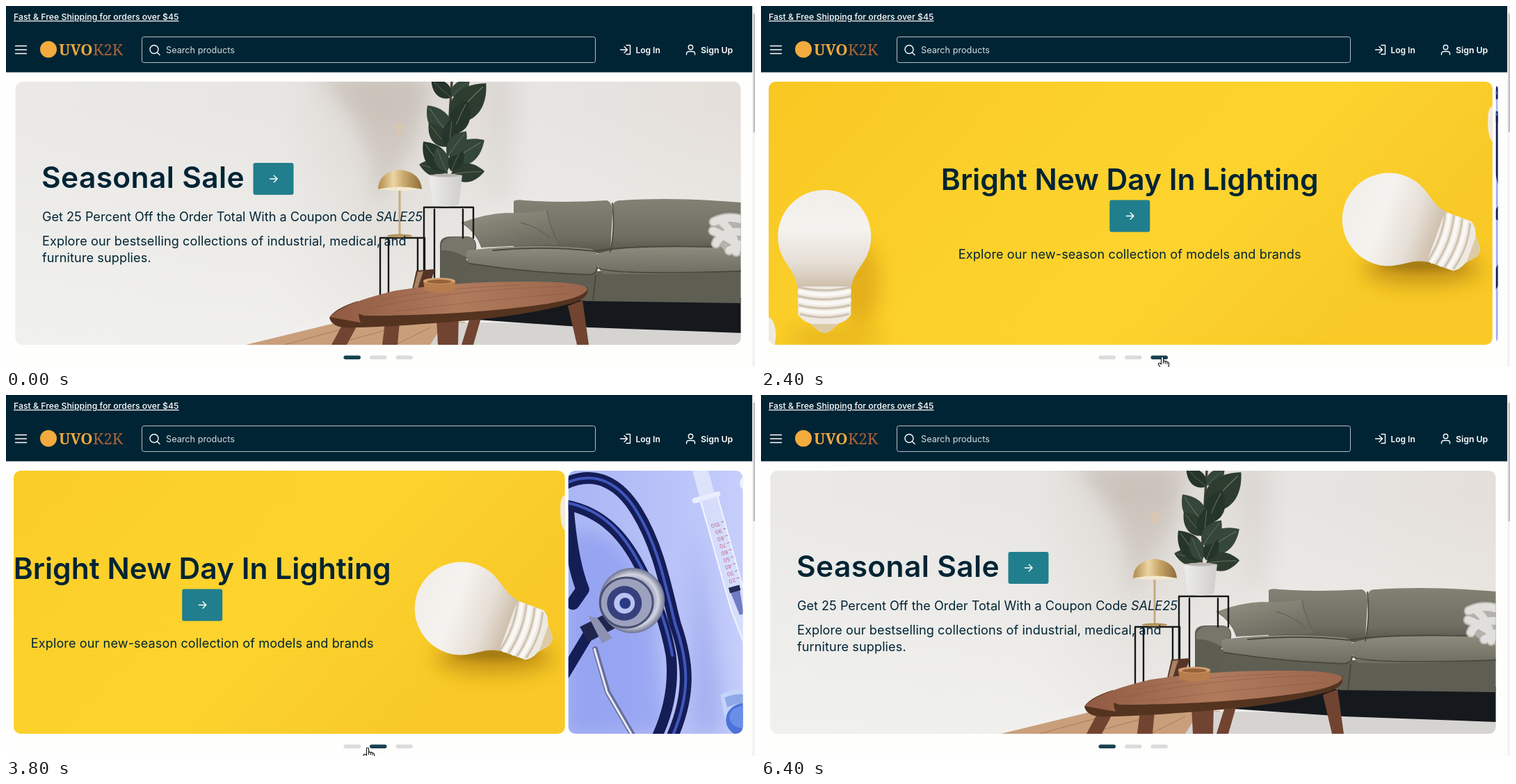
Animation of 1077x520 px, one loop 6.6 s. Source, as an HTML page:

```html
<!DOCTYPE html>
<html lang="en">
<head>
<meta charset="utf-8">
<title>Store carousel</title>
<style>
html, body { margin: 0; width: 100%; height: 100%; overflow: hidden; background: #fefefd; }
svg { display: block; width: 1077px; height: 520px; }
text { font-family: Inter, "Open Sans", sans-serif; font-optical-sizing: none; fill: #002434; white-space: pre; }
.h { font-size: 42.5px; font-weight: 600; }
.p { font-size: 18.1px; font-weight: 400; letter-spacing: .1px; }
.bar text { fill: #fff; font-size: 12.3px; font-weight: 600; }
.bar .logo { font-family: "Noto Serif", "Liberation Serif", serif; font-size: 22px; }
.line { fill: none; stroke: #fff; stroke-width: 1.4; stroke-linecap: round; stroke-linejoin: round; }
.num { font-size: 8px; fill: #c4668f; }
.n { fill: none; stroke-linecap: round; stroke-linejoin: round; }
</style>
</head>
<body>
<svg viewBox="0 0 1077 520" xmlns="http://www.w3.org/2000/svg">
<defs>
  <clipPath id="view"><rect x="11" y="109" width="1048.5" height="379" rx="10"/></clipPath>
  <clipPath id="card"><rect x="13.5" y="109" width="1043" height="379" rx="10"/></clipPath>
  <filter id="b6" x="-50%" y="-50%" width="200%" height="200%"><feGaussianBlur stdDeviation="6"/></filter>
  <filter id="b14" x="-60%" y="-60%" width="220%" height="220%"><feGaussianBlur stdDeviation="14"/></filter>
  <linearGradient id="wall">
    <stop offset="0" stop-color="#eae9e7"/><stop offset=".36" stop-color="#e8e6e3"/>
    <stop offset=".5" stop-color="#dcd7d2"/><stop offset=".6" stop-color="#e0dcd8"/>
    <stop offset=".72" stop-color="#e7e4e2"/><stop offset="1" stop-color="#e4dfda"/>
  </linearGradient>
  <linearGradient id="lift" x2="0" y2="1">
    <stop offset=".1" stop-color="#f3f3f0" stop-opacity="0"/><stop offset="1" stop-color="#f3f3f0" stop-opacity=".75"/>
  </linearGradient>
  <linearGradient id="brass">
    <stop offset="0" stop-color="#b08a4b"/><stop offset=".35" stop-color="#ecd5a4"/>
    <stop offset=".6" stop-color="#c9a668"/><stop offset="1" stop-color="#8f6c3b"/>
  </linearGradient>
  <linearGradient id="wood">
    <stop offset="0" stop-color="#8f5a42"/><stop offset=".5" stop-color="#b07a5d"/><stop offset="1" stop-color="#9a654b"/>
  </linearGradient>
  <linearGradient id="pot"><stop offset="0" stop-color="#ededec"/><stop offset="1" stop-color="#cfcdca"/></linearGradient>
  <linearGradient id="fabric" x2="0" y2="1"><stop offset="0" stop-color="#828174"/><stop offset=".7" stop-color="#6f6e62"/><stop offset="1" stop-color="#55554a"/></linearGradient>
  <linearGradient id="seat" x2="0" y2="1"><stop offset="0" stop-color="#8e8c7f"/><stop offset="1" stop-color="#6e6d61"/></linearGradient>
  <linearGradient id="pillow" x2=".6" y2="1"><stop offset="0" stop-color="#949284"/><stop offset="1" stop-color="#6d6c60"/></linearGradient>
  <linearGradient id="sun" x2="1" y2=".35">
    <stop offset="0" stop-color="#f8c722"/><stop offset=".4" stop-color="#fcd02b"/>
    <stop offset=".7" stop-color="#fdd32e"/><stop offset="1" stop-color="#f8c927"/>
  </linearGradient>
  <linearGradient id="glass" x2="0" y2="1">
    <stop offset="0" stop-color="#f1eeea"/><stop offset=".4" stop-color="#f5f3ef"/>
    <stop offset=".75" stop-color="#e6dfd6"/><stop offset="1" stop-color="#cfc0ad"/>
  </linearGradient>
  <linearGradient id="cool">
    <stop offset="0" stop-color="#a9b5f4"/><stop offset=".2" stop-color="#c0c9fa"/>
    <stop offset=".38" stop-color="#d9dffc"/><stop offset=".65" stop-color="#e6ecfc"/><stop offset="1" stop-color="#edf2fd"/>
  </linearGradient>
  <radialGradient id="chest">
    <stop offset="0" stop-color="#c5cbe6"/><stop offset=".4" stop-color="#4d5694"/>
    <stop offset=".8" stop-color="#d3d5e0"/><stop offset="1" stop-color="#6d7290"/>
  </radialGradient>
  <path id="leaf" d="M0 0C-14-7-17-26 1-42C17-26 15-8 0 0Z"/>
  <g id="btn">
    <rect width="58" height="46" rx="3" fill="#217e8c"/>
    <path class="line" d="M24 23H34.5M29.8 18.2L34.6 23L29.8 27.8"/>
  </g>
  <g id="bulb">
    <path d="M-38 60L-38 112Q-33 121 -21 125L-7 137Q0 140 7 137L21 125Q34 121 38 112V60Z" fill="#eee9e2"/>
    <path d="M-67 0A67 67 0 0 1 67 0C67 36 42 46 39 72H-39C-42 46-67 36-67 0Z" fill="url(#glass)"/>
    <path class="n" d="M-37 73Q0 82 37 73M-37 86Q0 95 37 86M-36 99Q0 108 36 99M-34 112Q0 121 34 112" stroke="#cfc2b0" stroke-width="3"/>
    <path class="n" d="M-36 79Q0 88 36 79M-36 92Q0 101 36 92M-35 105Q0 114 35 105" stroke="#faf8f5" stroke-width="5"/>
    <path d="M-20 126H20L7 137Q0 140-7 137Z" fill="#dccba6"/>
  </g>
  <path id="clamp" d="M326 214L305 186Q302 172 317 173Q331 174 328 188L326 218L341 270L351 335L354 390M324 214L330 250L345 312L366 372L388 359"/>
  <g id="rings"><ellipse cx="330" cy="405" rx="22" ry="26"/><ellipse cx="409" cy="377" rx="24" ry="27" transform="rotate(-20 409 377)"/></g>
  <path id="knot" d="M1018 311Q1040 300 1064 310M1017 324Q1034 330 1064 352M1021 342Q1030 322 1064 326M1030 312Q1048 326 1050 354M1040 352L1064 340"/>
</defs>

<rect width="1077" height="520" fill="#fefefd"/>

<g clip-path="url(#view)">
  <g id="s0"><g clip-path="url(#card)">
    <rect x="13" y="109" width="1044" height="379" fill="url(#wall)"/>
    <path d="M445 100H610L590 190Q560 250 525 300Q545 180 445 100Z" fill="#b9aea3" opacity=".5" filter="url(#b14)"/>
    <path d="M690 100H728V280H690Z" fill="#d0cac4" opacity=".45" filter="url(#b14)"/>
    <rect x="13" y="109" width="1044" height="379" fill="url(#lift)"/>
    <ellipse cx="566" cy="177" rx="6" ry="9" fill="#dfc6a8" opacity=".6"/>
    <path d="M330 488L480 441H640V488Z" fill="#f0efed"/>
    <path d="M345 488L480 455H660V488Z" fill="#c99f7b"/>
    <path d="M400 488L500 461M470 488L560 463M560 488L610 463" stroke="#a97c58" fill="none"/>
    <path d="M630 456Q800 455 1057 468V488H610Z" fill="#d6d4d1"/>
    <path d="M650 395L1057 420V471L838 463L650 450Z" fill="#15191d"/>

    <!-- sofa -->
    <path d="M730 281Q735 278 745 280Q800 284 864 280Q873 283 872 300L869 356H730Z" fill="url(#fabric)"/>
    <path d="M873 286Q875 279 886 280Q960 275 1057 283V356H869Q876 320 873 286Z" fill="url(#fabric)"/>
    <path d="M624 344Q624 332 640 332H664Q678 334 676 350L662 365V413L624 404Z" fill="#5d5d52"/>
    <path d="M626 344Q630 333 644 333H664Q676 335 675 348L662 362Q640 350 626 352Z" fill="#77766a"/>
    <path d="M660 366L848 382L1057 379V428L834 425L661 402Z" fill="#5f5e53"/>
    <path d="M664 352Q750 341 842 350Q856 355 850 382Q846 387 836 386Q740 382 666 370Q659 360 664 352Z" fill="url(#seat)"/>
    <path d="M850 357Q880 346 960 346Q1020 344 1057 350V381Q960 388 858 386Q846 370 850 357Z" fill="url(#seat)"/>
    <path class="n" d="M666 371Q750 384 836 387Q850 387 850 376Q860 388 1057 382M848 388L844 424" stroke="#45453c" stroke-width="1.6"/>
    <path class="n" d="M872 284Q876 320 869 354M700 352Q770 345 846 353Q900 344 1020 347" stroke="#484840" stroke-width="1.8"/>
    <path d="M655 312Q690 299 720 298Q750 299 778 295Q784 320 796 343Q740 345 684 348Q677 326 655 312Z" fill="url(#pillow)"/>
    <path class="n" d="M655 312Q677 326 684 348M778 295Q782 322 796 343M740 312Q765 318 782 334" stroke="#5a594e"/>
    <path d="M1012 314Q1016 302 1040 303L1057 306V360Q1020 356 1012 314Z" fill="#b5b1ac"/>
    <g class="n">
      <use href="#knot" stroke="#b5b1ac" stroke-width="15"/>
      <use href="#knot" stroke="#e1dfdb" stroke-width="11"/>
    </g>

    <!-- side tables, lamp and plant -->
    <path class="n" d="M601 400V290H672V334M616 395V293M657 334V293" stroke="#16181a" stroke-width="2.4"/>
    <path class="n" d="M538 420V334H602V390M550 418V336M592 386V336" stroke="#16181a" stroke-width="2.4"/>
    <path d="M566 262V331" stroke="#c5ab7e" stroke-width="3"/>
    <ellipse cx="566" cy="331" rx="18" ry="2.5" fill="#b4945f"/>
    <path d="M535 264Q536 239 566 236Q596 239 598 264Q566 258 535 264Z" fill="url(#brass)"/>
    <path d="M535 264Q566 257 598 264Q566 268 535 264Z" fill="#f4e9d1"/>
    <path class="n" d="M633 246Q637 180 641 108" stroke="#4b4233" stroke-width="3.5"/>
    <g id="plant"></g>
    <path d="M608 244Q632 239 656 244L651 286Q632 292 614 286Z" fill="url(#pot)"/>
    <path d="M608 244Q632 239 656 244Q632 249 608 244Z" fill="#b9b4ad"/>

    <!-- coffee table -->
    <path d="M590 381L617 379L606 410L584 408Z" fill="#553526"/>
    <path d="M592 383L600 382L592 407L586 406Z" fill="#a98264"/>
    <path d="M482 462L504 462L490 488H468ZM545 455H566L563 488H541ZM619 448L651 446L650 488H621ZM668 446H684L672 488H655ZM808 432L829 424L838 488H821Z" fill="#714431"/>
    <path d="M465 449Q472 436 506 425L520 446Q700 444 836 405Q840 420 815 428Q740 448 640 455Q540 463 503 463Q469 466 465 449Z" fill="#54331f"/>
    <path d="M465 448Q484 428 560 410Q650 396 760 397Q835 398 836 408Q830 424 740 434Q640 446 515 446L507 443Q507 450 510 456Z" fill="url(#wood)"/>
    <path class="n" d="M520 436Q640 408 800 404M560 440Q680 424 810 414M540 424Q620 406 740 402" stroke="#7f5039" opacity=".4"/>
    <path d="M600 396L602 409Q623 417 645 409L646 396Z" fill="#b87d4d"/>
    <ellipse cx="623" cy="396" rx="23" ry="4.5" fill="#d5a173"/><ellipse cx="623" cy="397" rx="18" ry="3" fill="#986239"/>
    </g>
    <g>
      <text class="h" x="51" y="262" letter-spacing=".35">Seasonal Sale</text>
      <use href="#btn" x="355.500" y="226"/>
      <text class="p" x="52" y="310" style="letter-spacing:0">Get 25 Percent Off the Order Total With a Coupon Code <tspan font-style="italic">SALE25</tspan></text>
      <text class="p" x="52" y="344.500">Explore our bestselling collections of industrial, medical, and</text>
      <text class="p" x="52" y="368.500">furniture supplies.</text>
    </g>
  </g>

  <g id="s1"><g clip-path="url(#card)">
    <rect x="13" y="109" width="1044" height="379" fill="url(#sun)"/>
    <ellipse cx="145" cy="400" rx="30" ry="62" fill="#dba317" opacity=".75" filter="url(#b14)"/>
    <ellipse cx="110" cy="478" rx="70" ry="16" fill="#d9a418" opacity=".6" filter="url(#b14)"/>
    <ellipse cx="955" cy="378" rx="85" ry="24" fill="#c18f12" opacity=".85" filter="url(#b14)"/>
    <ellipse cx="955" cy="372" rx="60" ry="9" fill="#8f6a10" opacity=".7" filter="url(#b6)"/>
    <ellipse cx="14" cy="474" rx="12" ry="26" fill="#efeae0"/>
    <path d="M1057 144Q1049 146 1050 168Q1050 190 1057 196Z" fill="#f0ece4"/>
    <use href="#bulb" x="96" y="332"/>
    <use href="#bulb" transform="translate(907.500 307.500) rotate(-70)"/>
    </g>
    <g text-anchor="middle">
      <text class="h" x="535" y="265">Bright New Day In Lighting</text>
      <use href="#btn" x="506" y="279.500"/>
      <text class="p" x="535" y="364">Explore our new-season collection of models and brands</text>
    </g>
  </g>

  <g id="s2"><g clip-path="url(#card)">
    <rect x="13" y="109" width="1044" height="379" fill="url(#cool)"/>
    <g transform="translate(-6 0)">
      <path d="M20 205Q100 180 140 290L160 488H20Z" fill="#7f90ee" opacity=".5" filter="url(#b14)"/>
      <path d="M200 190Q200 340 195 488H240V430Z" fill="#8c9ae6" opacity=".5" filter="url(#b14)"/>
      <g class="n" stroke="#151d57">
        <path d="M14 128C60 106 95 130 118 168C150 220 160 280 173 330C192 385 196 430 168 494" stroke-width="17"/>
        <path d="M14 158C70 168 100 205 121 245C145 290 160 335 167 375C172 420 162 460 146 494" stroke-width="15"/>
        <path d="M18 165Q24 240 40 280L26 300" stroke-width="19"/>
        <path d="M14 402L50 342" stroke-width="16"/>
        <path d="M14 128C60 106 95 130 118 168C150 220 160 280 173 330C192 385 196 430 168 494M16 155C70 165 100 202 121 242C145 287 162 335 169 375" stroke="#3f57bd" stroke-width="4"/>
      </g>
      <path class="n" d="M58 366L76 428L112 490" stroke="#686e98" stroke-width="8"/>
      <path class="n" d="M57 366L75 428L111 490" stroke="#e6e9f8" stroke-width="3"/>
      <path d="M85 309L96 331L48 356L36 334Z" fill="#1f254c"/>
      <path d="M48 318L62 322L82 350L68 358Z" fill="#8c91b2"/>
      <circle cx="111" cy="296" r="47" fill="url(#chest)"/>
      <ellipse cx="103" cy="299" rx="38" ry="36" fill="#9ca1be" stroke="#4a5072" stroke-width="3"/>
      <circle cx="100" cy="300" r="25" fill="#37407c"/><circle cx="100" cy="300" r="15" fill="#b9c4f2"/>
      <circle cx="101" cy="300" r="8" fill="#2b3a84"/>

      <g transform="translate(211 112) rotate(-15.500)">
        <rect x="-12" y="-12" width="22" height="45" fill="#dde3fb"/>
        <rect x="-24" y="32" width="42" height="8" rx="4" fill="#e9edfd"/>
        <path d="M-14 38H14V200L10 286H-4L-12 200Z" fill="#dfe5fd" opacity=".7"/>
        <path d="M-12 40V200L-4 286M13 40V200L10 286" fill="none" stroke="#f1f4ff" stroke-width="2"/>
        <path d="M-6 176H8L4 212H-2Z" fill="#6f7cc4"/><path d="M-7 170H9V178H-7Z" fill="#222b58"/>
        <g id="scale"></g>
      </g>
      <ellipse cx="274" cy="127" rx="8" ry="10" fill="#eff4ff"/><ellipse cx="300" cy="121" rx="9" ry="7" fill="#bfe0ee"/>

      <path d="M343 109H360L389 212L374 217Z" fill="#595f83"/>
      <path class="n" d="M352 112L381 212" stroke="#b4b8d4" stroke-width="4" stroke-dasharray="2 2"/>
      <path d="M374 216L388 211L401 258L415 318Q412 328 404 326L389 262Z" fill="#eef0fb"/>
      <path class="n" d="M388 212L401 258L415 318M390 262L402 258" stroke="#6d7295" stroke-width="2"/>

      <g class="n" stroke="#7d83ab" stroke-width="8"><use href="#clamp"/><use href="#rings"/></g>
      <g class="n" stroke="#dcdff2" stroke-width="4.5"><use href="#clamp"/><use href="#rings"/></g>
      <path d="M290 488L330 474L476 426L477 430L372 470L322 488ZM355 488L420 466L483 452L483 455L400 488Z" fill="#7b809f"/>
      <path class="n" d="M312 484L474 429M376 486L480 454" stroke="#c9cde0" stroke-width="2"/>
      <path d="M238 432Q266 416 292 432L299 470L246 474Z" fill="#c4d3fa"/>
      <path d="M244 436Q266 426 288 436L286 448Q266 440 248 450Z" fill="#8fa9e6"/>
      <ellipse cx="272" cy="468" rx="26" ry="24" fill="#4d72d8"/><ellipse cx="271" cy="464" rx="20" ry="16" fill="#6a8fe8"/>
    </g></g>
    <g>
      <text class="h" x="442" y="254" letter-spacing=".1">Best-Priced Medical</text>
      <text class="h" x="442" y="302.500" letter-spacing=".1">Supplies</text>
      <use href="#btn" x="630.500" y="267.500"/>
      <text class="p" x="442" y="352">Find and buy quality medical equipment and home healthcare</text>
      <text class="p" x="442" y="376">supplies</text>
    </g>
  </g>
</g>

<g class="bar">
  <rect width="1073" height="95.500" fill="#002434"/>
  <text x="11" y="20" style="font-weight:500;text-decoration:underline">Fast &amp; Free Shipping for orders over $45</text>
  <path class="line" d="M13.500 57.500H29.500M13.500 63H29.500M13.500 68.500H29.500" stroke-width="2"/>
  <circle cx="61" cy="62.500" r="12" fill="#f2ab3c"/>
  <text class="logo" x="76" y="71" style="fill:#f2ab3c;font-weight:700">UVO</text>
  <text class="logo" x="125" y="71" style="fill:#a9623a;font-weight:400">K2K</text>
  <rect x="195.500" y="44.500" width="652" height="37" rx="3" fill="none" stroke="#b5c1c6"/>
  <circle class="line" cx="213" cy="62.500" r="6"/><path class="line" d="M217.500 67L221 70.500"/>
  <text x="230" y="67.500" style="font-size:12.700px;font-weight:400;fill:#d5dde0">Search products</text>
  <path class="line" d="M883.500 63H893M889 58.500L893.500 63L889 67.500M892 56.500H897.500V69.500H892"/>
  <text x="905.500" y="67.500" style="font-size:12px">Log In</text>
  <circle class="line" cx="984.500" cy="59.500" r="3.200"/>
  <path class="line" d="M978.500 70V68.500Q979 65.500 982 65.500H987Q990.500 65.500 990.500 68.500V70"/>
  <text x="999" y="67.500">Sign Up</text>
</g>
<rect x="1073" width="4" height="520" fill="#f4f4f3"/>
<rect x="1074.500" y="11" width="3" height="171" fill="#bfbfbf"/>

<g id="dots">
  <rect x="485.500" y="503.500" width="24.500" height="5.500" rx="2.700"/>
  <rect x="523" y="503.500" width="24.500" height="5.500" rx="2.700"/>
  <rect x="560.500" y="503.500" width="24.500" height="5.500" rx="2.700"/>
</g>
<path id="hand" d="M-1.500 1Q0-1 1.500 1V6.500Q3 5.500 4.200 7Q6 6 7 7.700Q9.500 7.500 9.500 10V13L7.500 18H-1L-5.500 11.500Q-6 9-3.500 9.300L-1.500 11ZM1.500 7V10M4.300 7.500V10.500M7 8.500V11" fill="#fff" stroke="#111" stroke-width="1.100" stroke-linejoin="round"/>
</svg>

<script>
const LOOP = 6600, TICK = 200, PITCH = 1048, SPEED = 897;
const $ = id => document.getElementById(id);

// clicks: start time, direction, slide that becomes active
const clicks = [[1183, 1, 1], [2391, 1, 2], [3388, -1, 1], [4251, -1, 0]];
// pointer: time, x, y
const trail = [[1000, 533, 513], [1200, 530, 505], [1400, 526, 503], [1800, 540, 506], [2200, 574, 505],
  [2400, 577, 505], [2800, 572, 507], [3200, 545, 509], [3400, 540, 511], [3800, 520, 508],
  [4200, 498, 505], [4400, 496, 508], [4600, 494, 516]];
// leaves: base and tip
const leaves = [[640, 132, 611, 106], [641, 130, 666, 106], [640, 166, 689, 110], [642, 185, 662, 136],
  [638, 186, 605, 144], [636, 202, 607, 170], [638, 207, 640, 162], [638, 226, 687, 192], [634, 238, 594, 229],
  [634, 238, 599, 196], [634, 238, 618, 204], [640, 242, 688, 237], [640, 238, 655, 204], [636, 216, 661, 180]];
const greens = ['#26352b', '#35463a', '#2e3c30'];

$('plant').innerHTML = leaves.map(([x, y, tx, ty], i) => {
  const turn = Math.atan2(tx - x, y - ty) * 180 / Math.PI;
  const size = Math.hypot(tx - x, ty - y) / 42;
  return `<g transform="translate(${x} ${y}) rotate(${turn}) scale(${size})"><use href="#leaf" fill="${greens[i % 3]}"/>` +
    '<path d="M0 0Q-1-20 1-38" fill="none" stroke="#66745f" stroke-width=".8"/></g>';
}).join('');
$('scale').innerHTML = Array.from({ length: 9 }, (_, i) =>
  `<text class="num" transform="translate(6 ${72 + i * 10.5}) rotate(180)" y="-3">${100 - i * 10}</text>` +
  `<path d="M8 ${76 + i * 10.5}h4" stroke="#c4668f"/>`).join('');

// the CSS "ease" curve, solved by bisection
function ease(p) {
  if (p <= 0) return 0;
  if (p >= 1) return 1;
  const curve = (a, b, s) => 3 * a * s * (1 - s) ** 2 + 3 * b * s * s * (1 - s) + s ** 3;
  let lo = 0, hi = 1;
  for (let i = 0; i < 30; i++) {
    const mid = (lo + hi) / 2;
    if (curve(.25, .25, mid) < p) lo = mid; else hi = mid;
  }
  return curve(.1, 1, lo);
}

function pointer(t) {
  const i = trail.findIndex(k => k[0] > t);
  if (i < 1) return null;
  const [a, b] = [trail[i - 1], trail[i]];
  const p = (t - a[0]) / (b[0] - a[0]);
  return [a[1] + (b[1] - a[1]) * p, a[2] + (b[2] - a[2]) * p];
}

function draw(t) {
  let scroll = 0, active = 0;
  for (const [start, dir, slide] of clicks) {
    scroll += dir * PITCH * ease((t - start) / SPEED);
    if (t >= start) active = slide;
  }
  for (let i = 0; i < 3; i++) {
    $('s' + i).setAttribute('transform', `translate(${(i * PITCH - scroll).toFixed(2)} 0)`);
    $('dots').children[i].setAttribute('fill', i === active ? '#17424f' : '#dadbda');
  }
  const at = pointer(t);
  $('hand').style.display = at ? '' : 'none';
  if (at) $('hand').setAttribute('transform', `translate(${at})`);
}

const begin = performance.now();
function frame() {
  const t = (performance.now() - begin) % LOOP;
  draw(Math.floor((t + 1) / TICK) * TICK % LOOP);
  requestAnimationFrame(frame);
}
frame();
</script>
</body>
</html>
```
